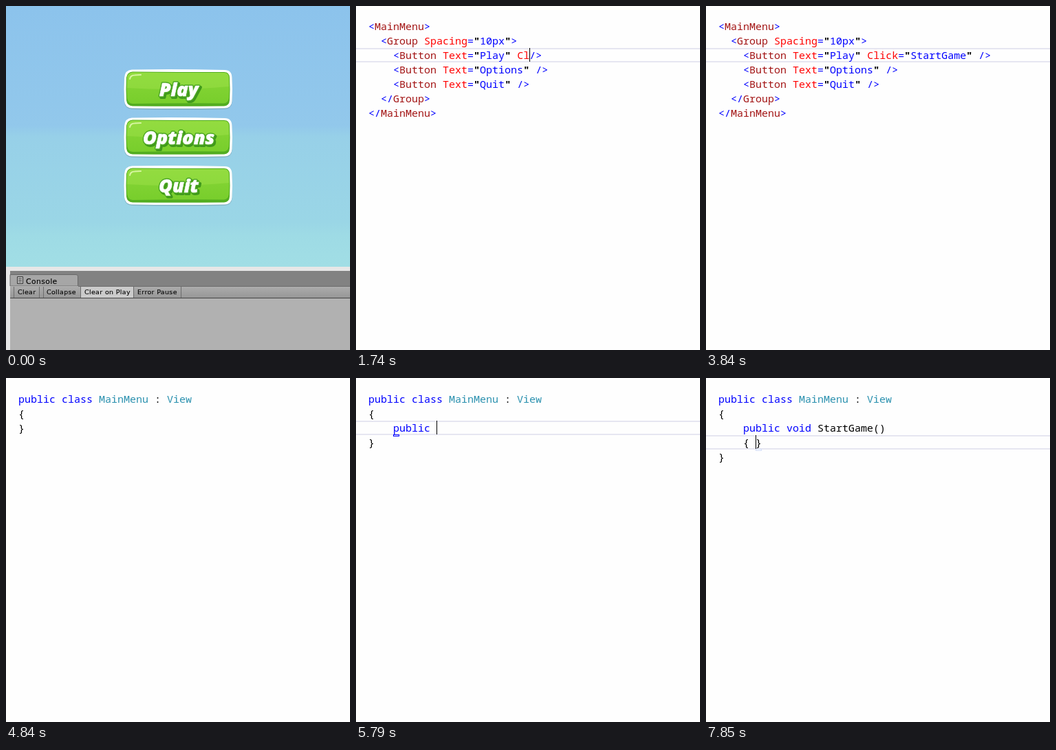
An HTML page for the animation above (8000 ms loop, 500 by 500 pixels).

```html
<!DOCTYPE html>
<html lang="en">
<head>
<meta charset="utf-8">
<title>Menu and code</title>
<style>
  html, body { margin: 0; width: 100%; height: 100%; overflow: hidden; background: #fefefe; }
  svg, #editor { position: absolute; left: 0; top: 0; width: 500px; height: 500px; overflow: hidden; }
  #editor { background: #fefefe; }
  #editor * { position: absolute; box-sizing: border-box; }
  #code { left: 18px; margin: 0; font: 15px/21px "Noto Sans Mono", monospace; color: #000; }
  #code span, #code b { position: static; }
  #bar { left: 0; width: 500px; height: 21px; border: solid #e6e6f1; border-width: 2px 0; }
  #caret { width: 1px; height: 20px; background: #000; }
  #tag { width: 9px; height: 3px; border: 1px solid; }
  .label { font: italic 800 27px "Open Sans", sans-serif; text-anchor: middle; }
  .console { font: 9.4px "DejaVu Sans", sans-serif; letter-spacing: .4px; fill: #080808; stroke: #080808; stroke-width: .15; }
  .console .tab { font-size: 10.8px; }
</style>
</head>
<body>
<svg id="menu" viewBox="0 0 500 500">
  <defs>
    <linearGradient id="sky" x2="0" y2="1">
      <stop stop-color="#8cc3ec"/><stop offset=".46" stop-color="#92c8eb"/>
      <stop offset=".5" stop-color="#97d0e8"/><stop offset=".83" stop-color="#9ad6e6"/>
      <stop offset=".88" stop-color="#9edbe5"/><stop offset="1" stop-color="#a1dee5"/>
    </linearGradient>
    <linearGradient id="green" x2="0" y2="1">
      <stop stop-color="#88d637"/><stop offset="1" stop-color="#78ce2c"/>
    </linearGradient>
    <linearGradient id="tool" x2="0" y2="1">
      <stop stop-color="#adadad"/><stop offset="1" stop-color="#979797"/>
    </linearGradient>
    <path id="plate" d="M12 .5Q78 -.5 147 1Q157 1 157.500 12Q158.500 29 157.500 46Q157 56 147 56.500Q78 57.500 12 56.500Q2 56 1 46Q0 29 1 12Q2 1 12 .5Z"/>
    <g id="button">
      <use href="#plate" y="1.500" fill="#789fb0" opacity=".6"/>
      <use href="#plate" fill="#fff"/>
      <path d="M13 3.500Q78 4 146 4Q153.500 4 154 12Q155 29 154 45Q153.500 53 146 53.500Q78 54 13 53.500Q5 53 4 45Q3 29 4 12Q5 4 13 3.500Z" fill="#52ad20"/>
      <path d="M13 4.500Q78 5 146 5Q152.500 5 153 12Q154 28 153 42Q152 49 146 49.500Q78 49 13 50Q6 49 5 42Q4 28 5 12Q6 5 13 4.500Z" fill="url(#green)"/>
      <path d="M5 12Q6 5 13 4.500Q78 5 146 5Q152.500 5 153 12V25Q78 32 5 27Z" fill="#a4e34f" opacity=".4"/>
      <path d="M9 14Q10 8.500 16 8.500L25 8" fill="none" stroke="#d6f5a0" stroke-width="2" stroke-linecap="round"/>
    </g>
  </defs>
  <rect width="500" height="379" fill="url(#sky)"/>
  <g id="buttons"></g>
  <rect y="379" width="500" height="121" fill="#e7e7e7"/>
  <path d="M6 385H500V424H6Z" fill="#828282"/>
  <path d="M6 407V390.500H102Q104.500 390.500 104.500 393V407Z" fill="#a6a6a6" stroke="#696969"/>
  <path d="M6 407H500V424H6Z" fill="url(#tool)"/>
  <path d="M109 407H186V424H109Z" fill="#cbcbcb"/>
  <path d="M105 407.500H500M11.500 408V424M48.500 408V424M54.500 408V424M108.500 408V424M185.500 408V424M254.500 408V424" stroke="#6c6c6c"/>
  <path d="M6 425H500V500H6Z" fill="#b1b1b1"/>
  <path d="M6 424.500H500" stroke="#454545"/>
  <path d="M16.500 393.500H24.500V403.500H16.500ZM18 396H23M18 398.500H23M18 401H23" fill="#c5c5c5" stroke="#333"/>
  <g class="console">
    <text class="tab" x="29" y="404">Console</text>
    <text x="17" y="419">Clear</text>
    <text x="59" y="419">Collapse</text>
    <text x="114" y="419">Clear on Play</text>
    <text x="191" y="419">Error Pause</text>
  </g>
</svg>
<div id="editor">
  <div id="bar"></div>
  <pre id="code"></pre>
  <div id="tag"></div>
  <div id="caret"></div>
</div>
<script>
const $ = id => document.getElementById(id);
const LOOP = 8000, LINE = 21, CHAR = 9, LEFT = 18;

$('buttons').innerHTML = ['Play', 'Options', 'Quit'].map((name, i) => `
  <g transform="translate(171 ${92 + i * 70})"><use href="#button"/>
    <g class="label" stroke-linejoin="round">
      <text x="82" y="41" fill="#3f981b" stroke="#3f981b" stroke-width="4">${name}</text>
      <text x="80" y="39" fill="#4da823" stroke="#4da823" stroke-width="3.500">${name}</text>
      <text x="80" y="39" fill="#fff" stroke="#fff" stroke-width=".6">${name}</text>
    </g>
  </g>`).join('');

// "|" marks a visible caret, "¦" a hidden one.
const xml = attr => `<MainMenu>
  <Group Spacing="10px">
    <Button Text="Play" ${attr}/>
    <Button Text="Options" />
    <Button Text="Quit" />
  </Group>
</MainMenu>`;
const click = value => xml(`Click="${value}`);
const view = body => `public class MainMenu : View\n{${body}}`;
const member = text => view(`\n    ${text}|\n`);
const method = text => member('public void ' + text);
const blueTag = [54, '#00f'], paleTag = [72, '#d3def8'];
const block = caret => view(`\n    public void StartGame()\n    { ${caret}}\n`);

const steps = [
  [500, xml('')],
  [1620, xml('|')], [1740, xml('Cl|')], [1860, xml('Cli|')], [1980, xml('Click|')],
  [2480, click('|"')], [2680, click('S|"')], [2800, click('St|"')], [2920, click('Star|"')],
  [3040, click('Start|"')], [3160, click('StartGa|"')], [3280, click('StartGam|"')],
  [3400, click('StartGame"|')], [3520, click('StartGame" |')], [3840, click('StartGame" ¦')],
  [4840, view('\n')], [4960, view('|\n')], [5110, member('')],
  [5310, member('p')], [5510, member('publ'), blueTag], [5660, member('public'), blueTag],
  [5790, member('public '), blueTag], [5910, member('public v'), blueTag],
  [6030, member('public voi'), blueTag], [6150, method('')],
  [6350, method('S')], [6470, method('Star')], [6590, method('StartG')], [6710, method('StartGa')],
  [6830, method('StartGam')], [6950, method('StartGame')], [7070, method('StartGame(')],
  [7170, method('StartGame()')],
  [7320, view('\n    public void StartGame()\n    |\n')],
  [7420, block('|'), paleTag], [7570, block('¦'), paleTag], [7850, block('|'), paleTag]
];

const paint = (color, text) => `<span style="color:${color}">${text.replace('<', '&lt;')}</span>`;
const quote = '<b>"</b>';
const paintXml = text => text.replace(/(<\/?)(\w+)|"([^"]*)"|\w+|[=\/>]+/g, (all, open, tag, value) =>
  open ? paint('#00f', open) + paint('#a31515', tag)
  : value !== undefined ? quote + paint('#00f', value) + quote
  : paint(/\w/.test(all) ? '#f00' : '#00f', all));
const paintCode = text => text.replace(/\b(public|class|void)\b|MainMenu|View/g, (all, keyword) =>
  paint(keyword ? '#00f' : '#2b91af', all));

function show([, text, tag]) {
  const isXml = text[0] === '<', origin = isXml ? 19 : 20;
  const at = text.search(/[|¦]/), before = text.slice(0, Math.max(at, 0)).split('\n');
  const top = origin + (before.length - 1) * LINE;
  const place = (id, visible, x, y) =>
    $(id).style.cssText = `display:${visible ? 'block' : 'none'};left:${x}px;top:${y}px`;
  place('bar', at >= 0, 0, top);
  place('caret', text[at] === '|', LEFT + before.pop().length * CHAR, top);
  place('tag', tag, tag ? tag[0] : 0, top + LINE - 1);
  if (tag) $('tag').style.borderColor = tag[1];
  $('code').style.top = origin + 'px';
  $('code').innerHTML = (isXml ? paintXml : paintCode)(text.replace(/[|¦]/, ''));
}

let current;
function frame() {
  const time = performance.now() % LOOP;
  const step = steps.filter(([start]) => start <= time).pop() || null;
  if (step !== current) {
    current = step;
    $('editor').style.display = step ? 'block' : 'none';
    if (step) show(step);
  }
  requestAnimationFrame(frame);
}
frame();
</script>
</body>
</html>
```
